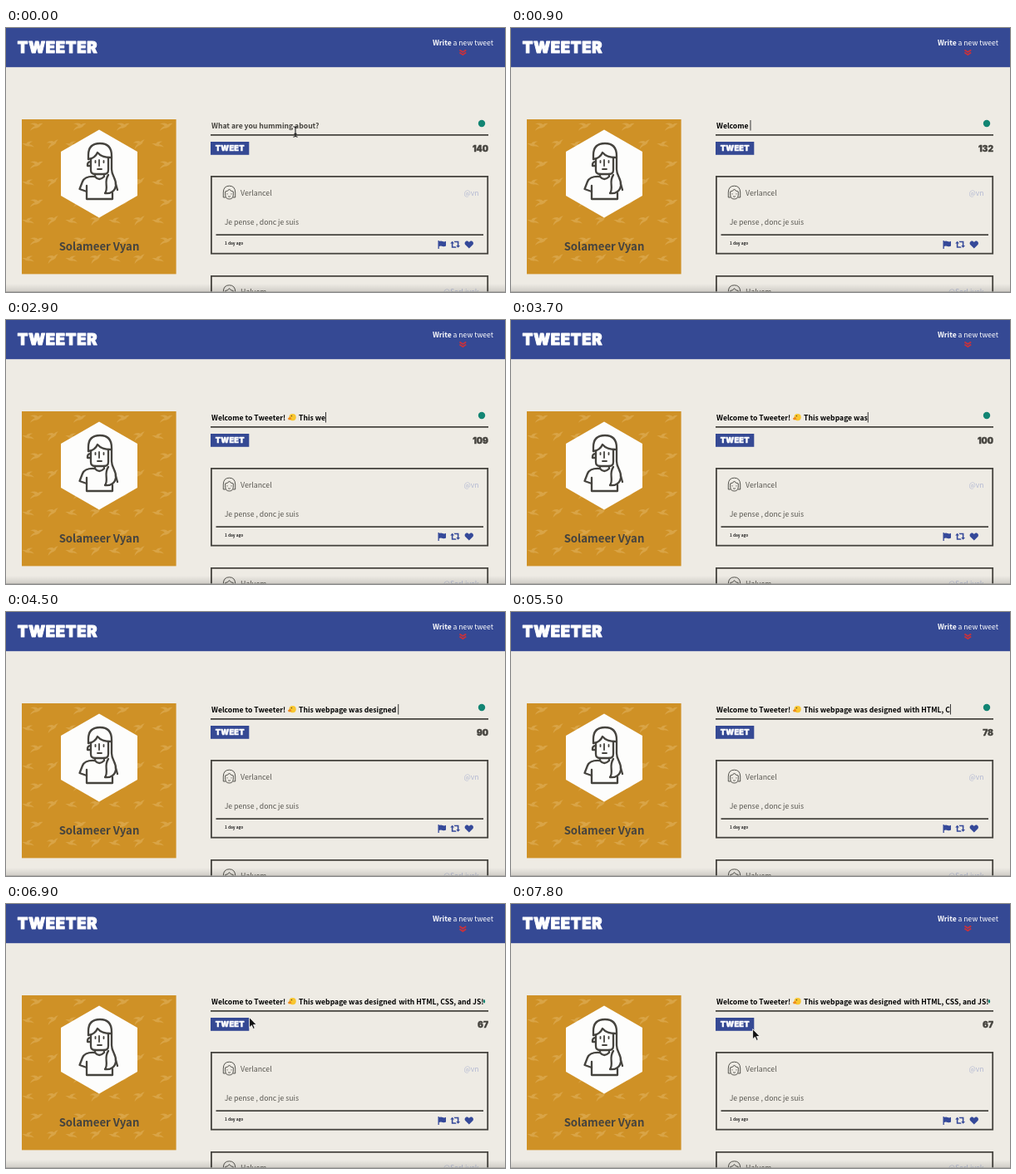
Animation of 600 by 318 pixels, one loop 8000 ms. Source, as an HTML page:

```html
<!DOCTYPE html>
<html lang="en">
<head>
<meta charset="utf-8">
<title>Tweeter</title>
<style>
  html, body { margin: 0; width: 100%; height: 100%; overflow: hidden; background: #eeebe4; }
  svg { display: block; width: 600px; height: 318px; }
  text { font: 400 8.7px "Noto Sans CJK JP", "Noto Sans CJK SC", "Noto Sans CJK", "Open Sans", sans-serif; white-space: pre; }
  .block { font-family: Inter, "Open Sans", sans-serif; font-weight: 900; stroke-linejoin: round; }
  .light { font-weight: 300; fill: #595751; }
  .field { font-size: 8.62px; font-weight: 700; fill: #000; }
  .end { text-anchor: end; }
  .line { fill: none; stroke: #45433e; stroke-width: 1.8; }
  .ink { stroke-width: 2.3; stroke-linecap: round; stroke-linejoin: round; }
  .thin { stroke-width: .9; stroke-linejoin: round; }
</style>
</head>
<body>
<svg viewBox="0 0 600 318">
  <defs>
    <path id="bird" fill="#dfae57" d="M-8 3Q-5-1-1-1Q-2-4-6-5Q1-6 3-2Q6-3 9-2Q6-1 4 1Q0 2-2 1.4Q-5 1.6-8 3Z"/>
    <pattern id="flock" x="14" y="103" width="52" height="46" patternUnits="userSpaceOnUse">
      <use href="#bird" transform="translate(22 16) rotate(-14)"/>
      <use href="#bird" transform="translate(42 37) rotate(-28) scale(.95)"/>
      <use href="#bird" transform="translate(13 38) scale(-.85 .85)"/>
    </pattern>
    <linearGradient id="shade" x2="0" y2="1">
      <stop offset="0" stop-opacity="0"/>
      <stop offset="1" stop-opacity=".13"/>
    </linearGradient>
    <g id="face" class="line thin">
      <path d="M-4.8-1V3Q-4.6 8 0 8Q4.6 8 4.8 3V-1"/>
      <path d="M-4.8-1Q-1-1.5 0-4Q1-1.5 4.8-1M-4.4 6H-7.2V0Q-7-7.8 0-7.8Q7-7.8 7.2 0V6H4.4"/>
      <path d="M-2.4 1.4v1M2.4 1.4v1M-1.4 4.8Q0 5.6 1.4 4.8"/>
    </g>
  </defs>

  <rect width="600" height="318" fill="#eeebe4"/>
  <rect width="600" height="47.2" fill="#354994"/>
  <text class="block" x="13.8" y="30" style="font-size:18.4px;letter-spacing:.75px" fill="#fff" stroke="#fff">TWEETER</text>
  <text class="end" x="586" y="20.6" style="font-size:8.6px" fill="#fff"><tspan font-weight="700">Write</tspan> a new tweet</text>
  <path id="chevrons" d="M545.4 26.4L549.3 29L553.2 26.4M545.4 29.6L549.3 32.2L553.2 29.6" fill="none" stroke="#c8323c" stroke-width="1.8"/>

  <rect x="19" y="110" width="185.6" height="186.4" fill="#cf9126"/>
  <rect x="19" y="110" width="185.6" height="186.4" fill="url(#flock)" opacity=".65"/>
  <path d="M112 122.5L158 149V202L112 228.5L66 202V149Z" fill="#fdfdfc"/>
  <g class="line ink">
    <path d="M99 158V153Q99 139 113 139Q127 139 127 154V170C127 179 133 181 132 190C131 197 125 200 119 199C124 192 117 186 123 177"/>
    <path d="M99 158Q107 157 110 150Q115 156 126 156"/>
    <path d="M102 158V171Q102 176 107 176H118Q123 176 123 171V157"/>
    <path d="M102 161Q97.5 161 98 166H101"/>
    <path d="M107.5 160v2M117.5 160v2M112 159V166M110 170H115" stroke-width="1.8"/>
    <path d="M107 176V179Q95 178 92 185L88.5 194L97 197M107 179Q112 185 118 179V176"/>
    <path d="M97 190V206H128V199M132 188L134 195"/>
  </g>
  <text x="112" y="268" text-anchor="middle" style="font-size:13.2px;font-weight:700" fill="#45433e">Solameer Vyan</text>

  <text id="hint" class="field" x="247" y="120.7" style="fill:#45433e">What are you humming about?</text>
  <text class="field part" x="247" y="120.7"></text>
  <g id="chick">
    <circle cx="344.6" cy="117.2" r="4.1" fill="#f8c630"/>
    <path d="M338.8 118.4L342 116.4L343.4 119.6L340 120.4Z" fill="#ee8a1d"/>
    <circle cx="343.4" cy="115.6" r=".7" fill="#3a2a18"/>
  </g>
  <text class="field part" x="352" y="120.7"></text>
  <text class="field part" x="472.2" y="120.7"></text>
  <rect id="caret" y="111" width=".9" height="12.5" fill="#222"/>
  <circle id="badge" cx="572" cy="115" r="4.2" fill="#128573"/>
  <ellipse id="sliver" cx="575" cy="117.3" rx="1.1" ry="2.2" fill="#128573"/>
  <path class="line" d="M246 128.8H580"/>
  <rect x="246" y="137" width="46.3" height="15.8" fill="#354994"/>
  <text class="block" x="269.3" y="148.4" text-anchor="middle" style="font-size:9.1px;letter-spacing:.3px" fill="#fff" stroke="#fff" stroke-width=".5">TWEET</text>
  <text id="count" class="block end" x="580" y="148.6" style="font-size:10.2px" fill="#45433e" stroke="#45433e" stroke-width=".4"></text>

  <rect class="line" x="246.9" y="178.9" width="332.3" height="92.8"/>
  <use href="#face" x="268.5" y="198"/>
  <text class="light" x="282" y="201.8" style="font-size:8.8px">Verlancel</text>
  <text class="end" x="568.5" y="201.8" fill="#b4bad3">@vn</text>
  <text class="light" x="262.7" y="236.5">Je pense , donc je suis</text>
  <path class="line" d="M252.5 249.2H574"/>
  <text x="263" y="260.8" style="font-size:4.8px;font-weight:700" fill="#222">1 day ago</text>
  <g fill="#354999">
    <path d="M519.5 256H520.8V257Q523 256 525 257T529 256.8V262.6Q527 263.8 525 263T520.8 263V266H519.5Z"/>
    <path d="M534.2 259.6L536.6 256.8L539 259.6H537.4V263.3H540.5L541.8 264.8H535.8V259.6ZM546 262L543.6 264.8L541.2 262H542.8V258.3H539.7L538.4 256.8H544.4V262Z"/>
    <path d="M556.8 265.6L552.2 261C550.2 258.4 553.8 254.6 556.8 257.9C559.8 254.6 563.4 258.4 561.4 261Z"/>
  </g>

  <path class="line" d="M246.9 318V298.8H579.2V318"/>
  <use href="#face" x="268.5" y="317.6"/>
  <text class="light" x="282" y="321.2" style="font-size:8.8px">Halvem</text>
  <text class="end" x="568.5" y="321.2" fill="#b4bad3">@SerLivek</text>
  <rect y="308" width="600" height="10" fill="url(#shade)"/>
  <rect y="317.3" width="600" height=".7" fill="#a3a29e"/>

  <g id="beam" fill="none" stroke="#222" stroke-width="1.1">
    <path d="M-2.6-6.2Q0-6.2 0-4.6Q0-6.2 2.6-6.2M0-5V5M-2.6 6.2Q0 6.2 0 4.6Q0 6.2 2.6 6.2M-1.5 2.4H1.5"/>
  </g>
  <path id="arrow" d="M0 0V12.2L2.8 9.6L4.7 13.8L6.6 13L4.8 8.9H8.6Z" fill="#111" stroke="#fff" stroke-width=".8"/>
</svg>
<script>
  const LOOP = 8000, STEP = 100, LIMIT = 140;
  const $ = id => document.getElementById(id);
  const parts = [...document.querySelectorAll('.part')];
  // first character position and wording of each stretch; the emoji fills 20 to 23
  const lines = [
    [0, 'Welcome to Tweeter! '],
    [24, 'This webpage was designed '],
    [50, 'with HTML, CSS, and JS!']
  ];
  const typing = [[0, 0], [200, 0], [1800, 19], [1900, 20], [2050, 20], [2150, 23], [2300, 24],
    [2900, 31], [4500, 50], [5500, 62], [6400, 73]];
  const pointer = [[6400, 348, 125], [6600, 330, 126], [6900, 292.6, 136.6], [7200, 291, 145], [7500, 290.6, 150.6]];

  // linear value of column c in a table of [time, ...values]
  function at(table, t, c = 1) {
    const i = table.findIndex(row => row[0] > t);
    if (i < 0) return table[table.length - 1][c];
    if (i === 0) return table[0][c];
    const a = table[i - 1], b = table[i];
    return a[c] + (b[c] - a[c]) * (t - a[0]) / (b[0] - a[0]);
  }

  const show = (el, on) => el.setAttribute('visibility', on ? 'visible' : 'hidden');
  const place = (el, x, y) => el.setAttribute('transform', `translate(${x} ${y})`);

  function draw(t) {
    const n = Math.floor(at(typing, t) + .01);
    let caretX = 247;
    lines.forEach(([start, words], i) => {
      const text = words.slice(0, Math.max(0, n - start));
      parts[i].textContent = text;
      if (text) caretX = +parts[i].getAttribute('x') + parts[i].getComputedTextLength();
    });
    if (n === 23) caretX = 349.5;
    if (n === 24) caretX = 351.5;
    $('caret').setAttribute('x', caretX);
    show($('caret'), n > 0 && n < 73);
    show($('hint'), n === 0);
    show($('chick'), n >= 23);
    show($('badge'), n < 70);
    show($('sliver'), n >= 70);
    $('count').textContent = LIMIT - n;

    const low = (t >= 1000 && t < 1900) || (t >= 6500 && t < 7400);
    place($('chevrons'), 0, low ? .6 : 0);

    const x = at(pointer, t), y = at(pointer, t, 2);
    place($('beam'), x, y);
    place($('arrow'), x, y);
    show($('beam'), n === 0 || (t >= 6500 && y < 129));
    show($('arrow'), t >= 6500 && y >= 129);
  }

  const begin = performance.now();
  function tick() {
    const t = (performance.now() - begin) % LOOP;
    draw(Math.floor(t / STEP) * STEP);
    requestAnimationFrame(tick);
  }
  tick();
</script>
</body>
</html>
```
